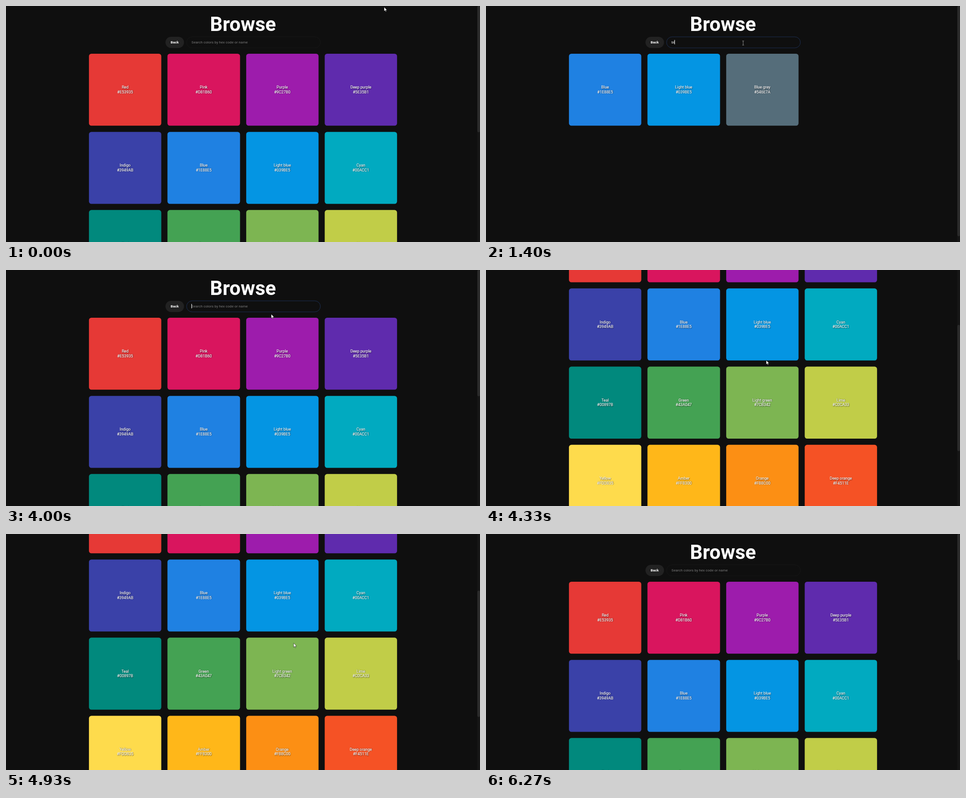
An HTML page for the animation above (6.34 s loop, 1058 px wide and 529 px high).

```html
<!DOCTYPE html>
<html lang="en">
<head>
<meta charset="utf-8">
<title>Browse</title>
<style>
  html, body { margin: 0; width: 100%; height: 100%; overflow: hidden; background: #0f0f0f; }
  #stage { position: relative; width: 1058px; height: 529px; overflow: hidden; background: #0f0f0f; }
  #page {
    position: absolute; left: 0; top: 0; width: 1920px; height: 1800px;
    transform-origin: 0 0; color: #fff; font: 16px Roboto, sans-serif;
  }
  #page > * { position: absolute; box-sizing: border-box; margin: 0; }
  h1 { left: 0; top: 28.5px; width: 100%; text-align: center; font-size: 80px; line-height: 93.75px; }
  .back {
    left: 646px; top: 125.2px; width: 75px; height: 46px; border-radius: 23px;
    background: #222; font-size: 14.667px; font-weight: 700; line-height: 47px; text-align: center;
  }
  .search {
    left: 731.3px; top: 125.2px; width: 542.7px; height: 45.4px; border-radius: 23px;
    border: 1.8px solid #1f1f1f; font-size: 14.667px; line-height: 43px; white-space: pre;
  }
  .search.focus { border-color: #28498a; }
  .search > * { position: absolute; left: 19.2px; top: 0; }
  #hint { color: #7a7a7a; }
  #typed.selected i { background: #3367d1; }
  i { font-style: normal; }
  #caret { display: inline-block; width: 1.6px; height: 18px; margin-right: -2px; vertical-align: -4px; background: #fff; }
  #grid { left: 336px; top: 193.8px; width: 1248px; display: grid; grid-template-columns: repeat(4, 1fr); gap: 25px; }
  .tile {
    height: 293px; border-radius: 10px; display: flex; flex-direction: column;
    align-items: center; justify-content: center;
    text-shadow: 1px 1px 3px rgba(0, 0, 0, .8); -webkit-text-stroke: .25px #fff;
  }
  #track { position: absolute; right: 0; top: 0; width: 6px; height: 529px; background: #161616; }
  #thumb { width: 6px; border-radius: 3px; background: #2a2a2a; }
  svg { position: absolute; left: 0; top: 0; overflow: visible; }
</style>
</head>
<body>
<div id="stage">
  <div id="page">
    <h1>Browse</h1>
    <div class="back">Back</div>
    <div class="search" id="search">
      <span id="hint">Search colors by hex code or name</span>
      <span id="typed"><i id="text"></i><i id="caret"></i></span>
    </div>
    <div id="grid"></div>
  </div>
  <div id="track"><div id="thumb"></div></div>
  <svg id="pointer" width="1" height="1">
    <path id="arrow" transform="scale(.551)" fill="#fff" stroke="#000"
      d="M0 0V17L4 13.2L6.6 19.2L9.2 18.1L6.6 12.2H12Z"/>
    <path id="beam" fill="none" stroke="#b4b4b4" stroke-width=".8"
      d="M-2-4.7H-.6L0-4.2L.6-4.7H2M0-4.2V4.2M-2 4.7H-.6L0 4.2L.6 4.7H2"/>
  </svg>
</div>
<script>
const LOOP = 6340, STEP = 200 / 3, SCALE = 1058 / 1920, VIEW = 529;
const FOCUS = 530, TYPE = 1200, KEY_GAP = 130, SELECT = 3400, CLEAR = 3530, BLUR = 6270;
const MAX_SCROLL = 460;
const $ = id => document.getElementById(id);

const COLORS = `Red #E53935, Pink #D81B60, Purple #9C27B0, Deep purple #5E35B1,
  Indigo #3949AB, Blue #1E88E5, Light blue #039BE5, Cyan #00ACC1,
  Teal #00897B, Green #43A047, Light green #7CB342, Lime #C0CA33,
  Yellow #FDD835, Amber #FFB300, Orange #FB8C00, Deep orange #F4511E,
  Brown #6D4C41, Grey #757575, Blue grey #546E7A, Rainbow`.split(/,\s+/);
const RAINBOW = 'linear-gradient(120deg, #46ee48, #00ea4c 65%, #00f046)';

// Pointer stops: time, x, y
const STOPS = [[0, 844, 2.5], [FOCUS, 574, 83], [3930, 574, 83], [4000, 592, 99],
  [4470, 634.5, 230.5], [4930, 642, 244.5], [5300, 614, 275], [5930, 95, 545]];

function ease(from, to, t) {
  const p = Math.min(1, Math.max(0, (t - from) / (to - from)));
  return p * p * (3 - 2 * p);
}

function pointerAt(t) {
  let [, x, y] = STOPS[0];
  for (let i = 1; i < STOPS.length; i++) {
    const [time, nx, ny] = STOPS[i], p = ease(STOPS[i - 1][0], time, t);
    x += (nx - x) * p;
    y += (ny - y) * p;
  }
  return [x, y];
}

const scrollAt = t => MAX_SCROLL * (ease(4000, 4640, t) - ease(4650, 5202, t));

const lettersAt = t => 'blue'.slice(0, Math.max(0, 1 + Math.floor((t - TYPE) / KEY_GAP)));

// Each input restarts the blink, which idles briefly before its first half-second
function caretOn(t) {
  const rest = [560, 1300, 1630, 3630].findLast(r => r - 100 <= t);
  return t >= FOCUS && Math.floor(Math.max(0, t - rest) / 500) % 2 === 0;
}

// The screen shows warm colours with more blue, and cold ones with less green
function paint(hex) {
  const [r, g, b] = [1, 3, 5].map(i => parseInt(hex.slice(i, i + 2), 16));
  const warm = Math.max(0, g - b), cold = Math.max(0, b - g);
  return `rgb(${r + 1}, ${g + .02 * warm - .08 * cold}, ${b + .14 * warm - .03 * cold})`;
}

function tile(label) {
  const [name, hex] = label.split(' #');
  return hex
    ? `<div class="tile" style="background:${paint('#' + hex)}"><span>${name}</span><span>#${hex}</span></div>`
    : `<div class="tile" style="background:${RAINBOW}"><b>${name}</b></div>`;
}

let shown = null, pageHeight = VIEW;

function fillGrid(query) {
  if (query === shown) return;
  shown = query;
  const hits = COLORS.filter(c => c.toLowerCase().includes(query));
  $('grid').innerHTML = hits.map(tile).join('');
  pageHeight = Math.max(542, 113 + Math.ceil(hits.length / 4) * 318 * SCALE);
}

function draw(t) {
  const typed = t < CLEAR ? lettersAt(t) : '';
  fillGrid(t < CLEAR ? lettersAt(t - 70) : '');
  $('text').textContent = typed;
  $('hint').style.display = typed ? 'none' : '';
  const selected = t >= SELECT && t < CLEAR;
  $('typed').className = selected ? 'selected' : '';
  $('caret').style.opacity = caretOn(t) && !selected ? 1 : 0;
  $('search').classList.toggle('focus', t >= FOCUS && t < BLUR);

  $('page').style.transform = `translateY(${-scrollAt(t)}px) scale(${SCALE})`;
  // The scrollbar trails the page slightly
  $('thumb').style.height = VIEW * VIEW / pageHeight + 'px';
  $('thumb').style.transform = `translateY(${scrollAt(t - 10) * VIEW / pageHeight}px)`;

  const [x, y] = pointerAt(t);
  const overInput = y > 69 && y < 94 && x > 403 && x < 702;
  $('pointer').style.transform = `translate(${x}px, ${y}px)`;
  $('arrow').style.display = overInput ? 'none' : '';
  $('beam').style.display = overInput ? '' : 'none';
}

const start = performance.now();
function tick() {
  const ms = (performance.now() - start) % LOOP;
  const k = Math.floor((ms + 4) / STEP);
  draw(Math.min(Math.round(k * STEP / 10) * 10, BLUR));
  requestAnimationFrame(tick);
}
tick();
</script>
</body>
</html>
```
